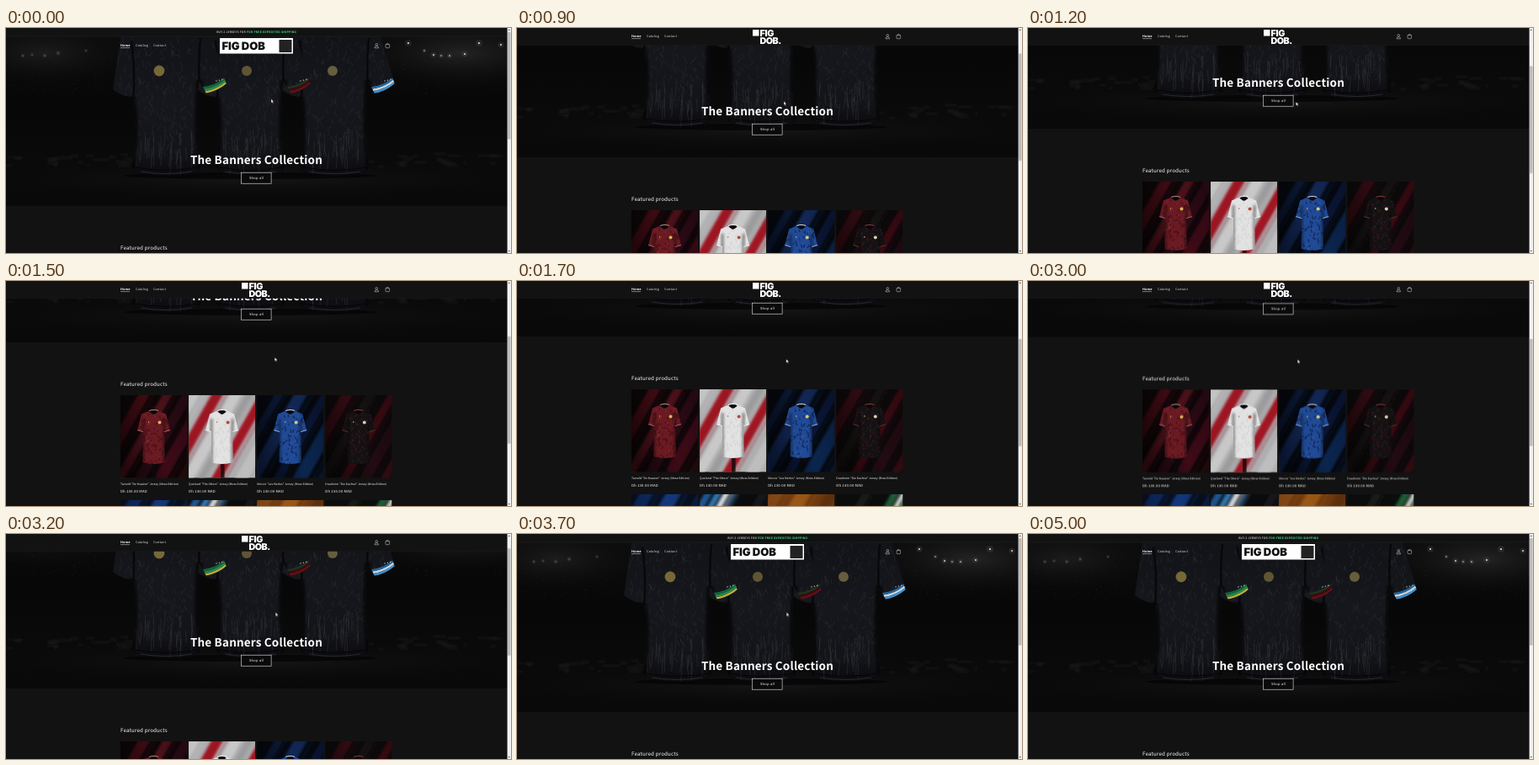
Write an HTML page that moves like this. It is 600 px wide and 268 px high and loops after 5.1 s.

```html
<!DOCTYPE html>
<html lang="en">
<head>
<meta charset="utf-8">
<title>Jersey shop</title>
<style>
  html, body { margin: 0; width: 100%; height: 100%; overflow: hidden; background: #121212; }
  svg { display: block; width: 100%; height: 100%; }
  text {
    font-family: "Noto Sans CJK SC", "Noto Sans CJK JP", "Noto Sans CJK", "Open Sans", sans-serif;
    fill: #fff;
    text-rendering: geometricPrecision;
  }
  .brand { font-family: Inter, "Liberation Sans", sans-serif; font-weight: 900; }
  .mid { text-anchor: middle; }
</style>
</head>
<body>
<svg id="stage" viewBox="0 0 600 268" preserveAspectRatio="none"></svg>
<script>
const LOOP = 5100;

let seed = 7;
const rand = (lo = 0, hi = 1) => {
  seed = (seed * 16807) % 2147483647;
  return lo + (hi - lo) * seed / 2147483647;
};
const near = (lo, hi) => rand(lo, hi).toFixed(1);
const many = (n, make) => Array.from({ length: n }, (_, i) => make(i)).join('');
const rect = (x, y, w, h, fill, more = '') =>
  `<rect x="${x}" y="${y}" width="${w}" height="${h}" fill="${fill}" ${more}/>`;
const dot = (x, y, r, fill, more = '') =>
  `<circle cx="${x}" cy="${y}" r="${r}" fill="${fill}" ${more}/>`;
const label = (x, y, size, str, more = '') =>
  `<text x="${x}" y="${y}" font-size="${size}" ${more}>${str}</text>`;
const line = (d, color, width, more = '') =>
  `<path d="${d}" fill="none" stroke="${color}" stroke-width="${width}" ${more}/>`;

// Hero: dark stadium with three black jerseys
const HERO_SHIRT = 'M-53 4L-63 73Q-52 82 -39 82Q-34 115 -40 165Q-39 172 -30 173Q0 178 32 173Q40 172 41 165Q35 115 39 62L48 78Q60 77 72 66L53 4Z';

function heroShirt(cx, bands, badge) {
  const curls = many(260, () =>
    `M${near(-60, 60)} ${near(10, 150)}q${near(-4, 4)} ${near(-2, 5)} ${near(-5, 5)} ${near(3, 8)}`);
  const pleats = many(34, () => `M${near(-38, 38)} ${near(118, 155)}q${near(-2, 2)} 8 ${near(-2, 2)} ${near(12, 26)}`);
  const stripes = bands.map((color, i) =>
    line(`M${46.5 - i} ${76.4 - i * 2.6}Q59 ${75 - i * 2.6} ${71.4 - i * .9} ${65.2 - i * 2.4}`, color, 2.6)).join('');
  return `<g transform="translate(${cx} 0)">
    <path d="${HERO_SHIRT}" fill="url(#cloth)"/>
    <g clip-path="url(#heroShirt)">
      ${line(curls, '#50525a', .5, 'opacity=".4"')}
      ${line(pleats, '#3c3e45', .8, 'opacity=".5"')}
      ${line('M-41 15Q-36 50 -39 84M41 12Q38 44 40 70', '#050507', 2.6, 'opacity=".8"')}
      <g filter="url(#soft)">${line('M-40 82Q-35 115 -41 170M40 62Q36 115 42 170', '#000', 8, 'opacity=".65"')}</g>
      ${line('M-36 166Q0 173 37 166', '#050507', 1.2)}
      ${line('M-30 171Q0 176 31 171', '#30323a', .8)}
      ${stripes}
    </g>
    ${many(3, i => dot(60 + i * 3.4, 63 - i * .8, .8, '#aaa'))}
    ${badge}
  </g>`;
}

const lights = [[478, 18, 1.6], [497, 27, 1.1], [508, 32, 1.4], [517, 33, 1.2], [527, 33, 1.3], [545, 31, 1.5],
  [562, 18, 1.7], [588, 20, 1.5], [20, 33, 1], [31, 32, .9], [46, 33, 1], [62, 30, 1.1], [95, 27, .9]];
const boards = many(44, i => {
  const x = i % 2 ? rand(430, 590) : rand(0, 150);
  return `M${x.toFixed(1)} ${near(150, 165)}h${near(4, 16)}`;
});

const hero = `<g clip-path="url(#heroBox)">
  ${rect(0, 10, 600, 202, 'url(#night)')}
  <ellipse cx="540" cy="30" rx="130" ry="42" fill="url(#haze)"/>
  <ellipse cx="45" cy="30" rx="110" ry="38" fill="url(#haze)" opacity=".7"/>
  ${many(150, i => dot(i % 2 ? near(455, 598) : near(0, 130), near(35, 78), near(.2, .6), '#777', 'opacity=".2"'))}
  ${lights.map(([x, y, r]) => dot(x, y, r * 2.4, '#bbb', 'opacity=".1"') + dot(x, y, r * .65, x > 300 ? '#ddd' : '#777')).join('')}
  <ellipse cx="298" cy="180" rx="330" ry="24" fill="url(#floor)"/>
  <g filter="url(#soft)">${line(boards, '#2b2b2b', 1.6, 'opacity=".5"')}</g>
  <ellipse cx="290" cy="176" rx="150" ry="4" fill="#000" opacity=".6"/>
  ${heroShirt(390, ['#3b91d1', '#c9d4d8', '#2266a0'], dot(-2, 51, 6, '#665d3e'))}
  ${heroShirt(290, ['#651016', '#3e0a0d', '#1d3524'], dot(-4, 51, 6, '#5f5535'))}
  ${heroShirt(190, ['#c3ac36', '#238a50', '#17643a'], dot(-8, 51, 6.4, '#776838'))}
</g>
${label(297.5, 161.5, 13.5, 'The Banners Collection', 'class="mid" font-weight="700" letter-spacing=".17"')}
${rect(279.5, 172.2, 35.6, 13, '#0a0a0a', 'stroke="#e8e8e8" stroke-width=".6"')}
${label(297.6, 180.3, 4, 'Shop all', 'class="mid" font-weight="500" letter-spacing=".28"')}`;

// Products: each streak is [top x, width, colour]
const products = [
  { name: 'Tarveld "De Kraaien" Jersey (Moss Edition)', base: '#10080a', shirt: '#6b1a22', trim: '#b08d80', badge: '#d2b45c', weave: '#3a0b12', shade: .65,
    streaks: [[32, 12, '#4e1019'], [60, 10, '#651421'], [84, 12, '#38101a'], [108, 14, '#4e101a'], [134, 9, '#2c0b10']] },
  { name: 'Quelund "The Otters" Jersey (Moss Edition)', base: '#aeaeb0', shirt: '#e2e2e2', trim: '#fff', badge: '#b5473f', weave: '#cfcfd2', shade: 0,
    streaks: [[10, 12, '#c4c4c5'], [38, 12, '#9c1824'], [60, 12, '#c8c8c9'], [76, 8, '#9b9b9d'], [94, 11, '#a01624'], [124, 14, '#bebebf']] },
  { name: 'Morvie "Les Merles" Jersey (Moss Edition)', base: '#070a12', shirt: '#204a96', trim: '#d8dce8', badge: '#d5c77e', weave: '#0a1a44', shade: .6,
    streaks: [[30, 9, '#0b1c3e'], [56, 14, '#12336d'], [86, 10, '#0a1f47'], [112, 16, '#102d60'], [138, 9, '#0b1a38']] },
  { name: 'Drauheim "Die Dachse" Jersey (Moss Edition)', base: '#0f0c0d', shirt: '#141113', trim: '#8b3a38', badge: '#d9cfae', weave: '#40121a', shade: .6,
    streaks: [[30, 12, '#3d0d14'], [58, 9, '#1c1819'], [84, 9, '#4c1019'], [108, 12, '#2a1014'], [132, 9, '#420d15']] },
  { base: '#0a1226', shade: .4, streaks: [[22, 14, '#0f2d6e'], [54, 16, '#133f92'], [88, 10, '#0d2252']] },
  { base: '#0a0b0d', shade: 0, streaks: [[14, 8, '#1f5590'], [26, 6, '#2f76b0'], [36, 6, '#cfd6da'], [46, 5, '#27496a'], [80, 9, '#15191e']] },
  { base: '#7a4010', shade: .2, streaks: [[14, 14, '#935015'], [46, 16, '#a55b18'], [80, 12, '#6a350e']] },
  { base: '#0b0d0c', shade: 0, streaks: [[40, 9, '#151a17'], [74, 8, '#1d5c35'], [84, 5, '#c8d0ca'], [92, 6, '#2a7a47'], [100, 5, '#a05a2a']] }
];
const CARD_SHIRT = 'M33 19Q39.5 24 46 19L54 22.5L59 42L52 44L52.5 80Q39.5 84 26.5 80L27 44L20 42L25 22.5Z';

function cardShirt({ shirt, trim, badge, weave }) {
  const flecks = (n, length) => many(n, () => `M${near(20, 59)} ${near(21, 81)}l${near(-2, 2)} ${near(1, length)}`);
  return `<path d="M38 76h4.5V99h-4.5Z" fill="#09090b" opacity=".8"/>
    <path d="M34 22Q35 17 39.5 17T45 22L43 25H36Z" fill="#08080a"/>
    <path d="${CARD_SHIRT}" fill="${shirt}"/>
    <g clip-path="url(#cardShirt)">
      ${line(flecks(90, 4), weave, 1.5, 'opacity=".6"')}
      ${line(flecks(60, 3), '#fff', .6, 'opacity=".14"')}
      <g filter="url(#soft)">${line('M27 28V82M52 28V82', '#000', 3, 'opacity=".45"')}</g>
    </g>
    <path d="M34.5 18.5Q39.5 27 44.5 18.5Z" fill="#08080a"/>
    ${line('M34 18.4Q39.5 16.6 45 18.4', trim, 1.1)}
    ${line('M20 41.6L27 43.6M59 41.6L52 43.6', trim, .7)}
    ${dot(46.5, 32.5, 2, badge)}${dot(33.5, 32, .7, badge)}`;
}

const cards = products.map((item, i) => {
  const x = 136 + (i % 4) * 81.1, y = i < 4 ? 275 : 400;
  const bands = item.streaks.map(([at, w, color]) =>
    line(`M${at} -8L${at - 66} 108`, color, w) +
    line(`M${at + w} -8L${at + w - 66} 108`, color, 1.5, 'opacity=".6"')).join('');
  return `<g transform="translate(${x} ${y})">
    <g clip-path="url(#card)">
      ${rect(0, 0, 79, 98.6, item.base)}<g filter="url(#soft)">${bands}</g>
      ${rect(0, 0, 79, 98.6, 'url(#cardShade)', `opacity="${item.shade}"`)}
      ${item.name ? cardShirt(item) : ''}
    </g>
    ${item.name ? label(0, 107.3, 3.4, item.name, 'font-weight="500" letter-spacing=".05"') +
      label(0, 115.7, 4.25, 'Dh 130.00 MAD', 'font-weight="500" letter-spacing=".19"') : ''}
  </g>`;
}).join('');

// Navigation row, y is its middle
const nav = y => `
  ${label(136, y + 1.4, 3.8, 'Home', 'font-weight="700" letter-spacing=".12"')}
  ${rect(136, y + 2.6, 11, .45, '#fff')}
  ${label(154, y + 1.4, 3.8, 'Catalog', 'fill-opacity=".85" letter-spacing=".17"')}
  ${label(175, y + 1.4, 3.8, 'Contact', 'fill-opacity=".85" letter-spacing=".17"')}
  <g fill="none" stroke="#ddd" stroke-width=".5">
    <circle cx="440.3" cy="${y - 1.2}" r="1.3"/>
    <path d="M438 ${y + 2.8}v-.6q0-1.5 2.3-1.5t2.3 1.5v.6z"/>
    <path d="M451 ${y - 1.4}h4.6v3.2q0 .9-.9.9h-2.8q-.9 0-.9-.9zM452.1 ${y - 1.4}q0-1.3 1.2-1.3t1.2 1.3"/>
  </g>`;

const topHeader = `<g id="topHeader">
  ${rect(0, 0, 596, 10, '#121212')}${rect(0, 9.8, 596, .4, '#2a2a2a')}
  <text class="mid" x="297.7" y="5.7" font-size="3.5" letter-spacing=".18">BUY 2 JERSEYS FOR <tspan font-weight="700" style="fill:#3fdc83">FOR FREE EXPEDITED SHIPPING</tspan></text>
  ${nav(21)}
  ${rect(254, 12, 87, 18.5, '#fff')}${rect(324.5, 14, 15, 15, '#222')}
  ${label(256.5, 26, 13, 'FIG DOB', 'class="brand" style="fill:#111" letter-spacing="-.1"')}
</g>`;

const stickyHeader = `<g id="stickyHeader">
  ${rect(0, 0, 596, 20.7, '#121212')}${rect(0, 20.5, 596, .3, '#222')}
  ${nav(10)}
  ${rect(280, 2, 7.5, 7.5, '#fff')}
  ${label(288.4, 9.6, 10.8, 'FIG', 'class="brand" letter-spacing="-.3"')}
  ${label(288.4, 18.5, 10.8, 'DOB.', 'class="brand" letter-spacing="-.5"')}
</g>`;

const grad = (id, kind, stops, more = '') => `<${kind}Gradient id="${id}" ${more}>${stops.map(([at, color, alpha = 1]) =>
  `<stop offset="${at}" stop-color="${color}" stop-opacity="${alpha}"/>`).join('')}</${kind}Gradient>`;
const down = 'x1="0" y1="0" x2="0" y2="1"';

document.getElementById('stage').innerHTML = `<defs>
  ${grad('night', 'linear', [[0, '#0c0c0d'], [.4, '#070708'], [.75, '#0a0a0a'], [1, '#090909']], down)}
  ${grad('cloth', 'linear', [[0, '#121317'], [.5, '#16171c'], [.85, '#131418'], [1, '#0b0b0e']], down)}
  ${grad('haze', 'radial', [[0, '#2a2a2b', .8], [1, '#101010', 0]])}
  ${grad('floor', 'radial', [[0, '#171717', .9], [1, '#0b0b0b', 0]])}
  ${grad('cardShade', 'linear', [[0, '#000'], [.55, '#000', .3], [1, '#000', .55]], 'x1="0" y1=".7" x2="1" y2=".3"')}
  <clipPath id="heroBox"><rect y="10" width="596" height="202"/></clipPath>
  <clipPath id="heroShirt"><path d="${HERO_SHIRT}"/></clipPath>
  <clipPath id="card"><rect width="79" height="98.6"/></clipPath>
  <clipPath id="cardShirt"><path d="${CARD_SHIRT}"/></clipPath>
  <filter id="soft"><feGaussianBlur stdDeviation="1.5"/></filter>
</defs>
${rect(0, 0, 600, 268, '#121212')}
<g id="page">${hero}
  ${label(136, 264.2, 6.2, 'Featured products', 'letter-spacing=".17"')}
  ${cards}
</g>
${topHeader}${stickyHeader}
${rect(595.6, 0, 4.4, 268, '#f1f1f1')}
<path d="M596.6 3L597.8 1.6L599 3Z" fill="#555"/>
<path d="M596.6 265L597.8 266.4L599 265Z" fill="#555"/>
<g id="thumb">${rect(596, 5, 3.6, 127.5, '#bdbdbd')}</g>
<path id="cursor" d="M0 0V4.5L1.1 3.5L1.9 5.2L2.6 4.9L1.9 3.3H3.3Z" fill="#fff" stroke="#000" stroke-width=".3"/>`;

// Every table holds [time, value]; a value stays until the next time
const start = document.timeline.currentTime;
function play(id, table, style) {
  const frames = table.map(([time, ...value]) => ({ offset: time / LOOP, easing: 'step-end', ...style(...value) }));
  frames.push({ ...frames[frames.length - 1], offset: 1 });
  const motion = document.getElementById(id).animate(frames, { duration: LOOP, iterations: Infinity });
  motion.startTime = start;
}

const scroll = [[0, 0], [900, 58], [1000, 65], [1100, 79], [1200, 92], [1300, 112], [1400, 130], [1500, 139],
  [1600, 144], [1700, 146], [1800, 146.3], [3000, 145.6], [3100, 92], [3200, 28], [3300, 7], [3400, 1], [3500, 0]];
const cursor = [[0, 315, 84.6, 1], [400, 316, 86, 1], [900, 317, 87.3, 1], [1200, 318.3, 88, 1], [1500, 319.2, 91, 1],
  [1700, 319.8, 93, 1], [3000, 320.2, 93.4, 1], [4700, 320.2, 93.4, 0]];
const atTop = [[0, 1], [900, 0], [3400, 1]];

play('page', scroll, y => ({ transform: `translateY(${-y}px)` }));
play('thumb', scroll, y => ({ transform: `translateY(${y * .44}px)` }));
play('cursor', cursor, (x, y, opacity) => ({ transform: `translate(${x}px, ${y}px)`, opacity }));
play('topHeader', atTop, opacity => ({ opacity }));
play('stickyHeader', atTop, top => ({ opacity: 1 - top }));
</script>
</body>
</html>
```
